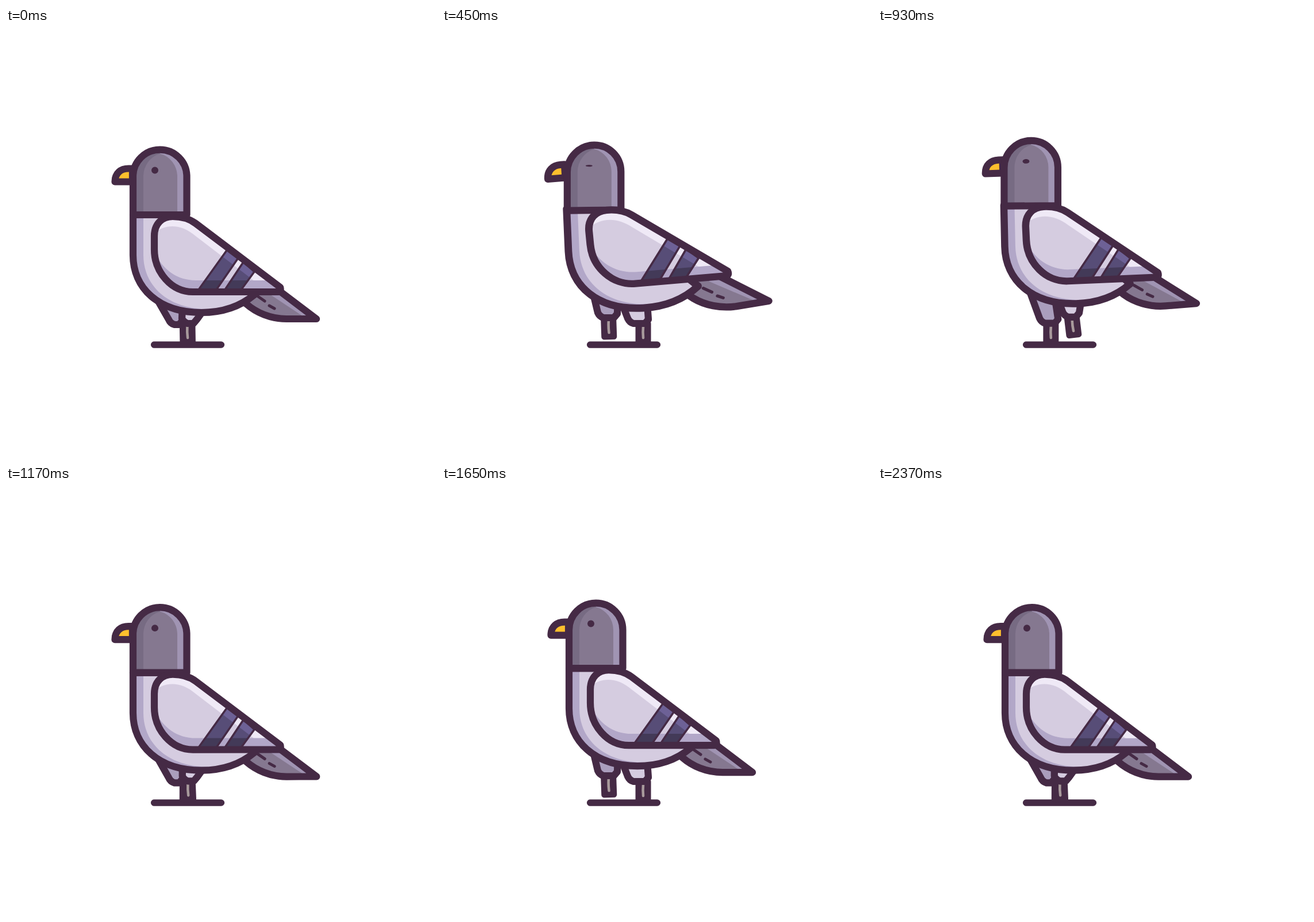
Recreate the animation shown at these times as an HTML page. Size 748 by 748 pixels, loop 2.4 s.

```html
<!DOCTYPE html>
<html lang="en">
<head>
<meta charset="utf-8">
<title>Walking pigeon</title>
<style>
  html, body { margin: 0; width: 100%; height: 100%; overflow: hidden; background: #fff; }
  svg { display: block; width: 100vw; height: 100vh; }
</style>
</head>
<body>
<svg id="stage" viewBox="0 0 748 748"></svg>
<script>
const INK = '#452a45', PALE = '#d5cce0', LIGHT = '#efe9f6', SHADE = '#b2a7c8', GREY = '#857890', SOFT = '#a094b3';
const OUTLINE = 12.2;
const stage = document.getElementById('stage');

const fill = (d, color) => `<path d="${d}" fill="${color}"/>`;
const line = (d, width, color = INK) =>
  `<path d="${d}" fill="none" stroke="${color}" stroke-width="${width}" stroke-linejoin="round" stroke-linecap="round"/>`;

// A filled outline with details clipped to its inside
const part = (id, d, base, details = '') => `
  <g id="${id}">
    <clipPath id="${id}Clip"><path d="${d}"/></clipPath>
    ${fill(d, base)}<g clip-path="url(#${id}Clip)">${details}</g>${line(d, OUTLINE)}
  </g>`;

const leg = (id, color) => `
  <g id="${id}Shin">
    <rect x="-13.5" y="-42" width="27" height="42" rx="5" fill="${INK}"/>
    <path d="M0 -32Q-1 -22 0 -12" fill="none" stroke="#a89a9c" stroke-width="4.5" stroke-linecap="round"/>
  </g>
  <path id="${id}Thigh" fill="${color}" stroke="${INK}" stroke-width="${OUTLINE}" stroke-linejoin="round"/>`;

const wingLight = 'M250 365C268 342 300 336 330 362L445 450H520V300H250Z';
const wingShade = 'M250 370C264 414 292 439 330 439H490V480H250Z';
const stripes = 'M386 384L333 458H364L404 400ZM413 407L379 458H407L432 424Z';

stage.innerHTML = `
  ${line('M257.7 551H374.3', 11.6)}
  <g id="tailBob">
    ${part('tail', 'M400 440L452 440L466 450L540 506H488C460 506 435 495 418 480L395 458Z', GREY,
      fill('M448 456L516 501H560L470 440Z', SOFT) +
      line('M437 466L450 475M458 483L467 488', 5))}
  </g>
  ${leg('far', '#aa9ebd')}
  ${leg('near', PALE)}
  <g id="bodyBob">
    ${part('body', 'M221 325V395C221 452 265 495 340 495C378 495 408 484 432 464L320 365L300 325Z', SHADE,
      fill('M239 320V395C239 448 281 489 352 489V500H450V320Z', PALE))}
    ${part('beak', 'M189.5 267.5C189.5 252 200 244.5 213 244.5H220V267.5Z', '#fdbf2d')}
    ${part('head', 'M221 325V258.3A46.75 46.75 0 0 1 314.5 258.3V325Z', '#776b83',
      fill('M268 200H320V330H268Z', SOFT) +
      fill('M239 330V258A41 41 0 0 1 268 218.5A41 41 0 0 1 298 258V330Z', GREY) +
      `<ellipse id="eye" cx="259" cy="247.5" rx="6" fill="${INK}"/>`)}
    ${part('wing', 'M258 385V362C258 340 272 328 290 328C305 328 318 331 330 340L477 451Q479 458 474 459H325C288 459 258 425 258 385Z', PALE,
      fill(wingLight, LIGHT) + fill(wingShade, SHADE) +
      `<clipPath id="stripeClip"><path d="${stripes}"/></clipPath>
       <g clip-path="url(#stripeClip)">` +
      fill(stripes, '#574d77') + fill(wingLight, '#6d6196') + fill(wingShade, '#433a58') +
      '</g>' + line(stripes, 3.5))}
  </g>`;

const el = {};
stage.querySelectorAll('[id]').forEach(node => el[node.id] = node);
const move = (id, value) => el[id].setAttribute('transform', value);

// Offset (dx, dy) at the anchor plus a linear stretch around it, scaled by k
function lean(id, k, [x, y], [dx, dy], [a, b, c, d]) {
  move(id, `matrix(${1 + k * a} ${k * c} ${k * b} ${1 + k * d}
    ${k * (dx - a * x - b * y)} ${k * (dy - c * x - d * y)})`);
}

// Smooth looping curve through values at the walk's key times
const STRIDE = 1200, TIMES = [0, 240, 450, 690, 870];
function sample(values, t) {
  const n = TIMES.length;
  const time = i => TIMES[(i + n) % n] + STRIDE * Math.floor(i / n);
  const value = i => values[(i + n) % n];
  const slope = i => (value(i + 1) - value(i - 1)) / (time(i + 1) - time(i - 1));
  let i = n - 1;
  while (TIMES[i] > t) i--;
  const span = time(i + 1) - time(i), u = (t - time(i)) / span, v = 1 - u;
  return v * v * (1 + 2 * u) * value(i) + u * u * (3 - 2 * u) * value(i + 1)
    + span * u * v * (v * slope(i) - u * slope(i + 1));
}

const GROUND = 551;
const legs = {
  far: {
    hip: [264, 306],
    kneeX: [295, 295, 288, 280, 296], kneeY: [516, 505, 504, 513, 513], half: [12, 15, 17, 17, 17],
    footX: [316, 307.5, 291, 275.5, 296], footY: [551, 540, 542, 551, 551], tilt: [0, -5, -2, 0, 0]
  },
  near: {
    hip: [308, 356],
    kneeX: [319, 331, 341, 341, 339], kneeY: [514, 512, 514, 515, 502], half: [13, 16, 18, 18, 15],
    footX: [316.5, 329.5, 350, 349.5, 346.5], footY: [551, 551, 551, 551, 538], tilt: [-2, 0, 0, 0, -7]
  }
};

function poseLeg(id, t, bob) {
  const { hip, ...keys } = legs[id];
  const at = name => sample(keys[name], t);
  const x = at('kneeX'), y = at('kneeY'), half = at('half'), top = 474 + bob;
  el[id + 'Thigh'].setAttribute('d', `M${hip[0]} ${top}L${x - half} ${y - 9}Q${x - half + 3} ${y - 2} ${x - half + 10} ${y}
    L${x + half - 6} ${y}L${x + half} ${y - 7}L${hip[1]} ${top}Z`);
  move(id + 'Shin', `translate(${at('footX')} ${Math.min(GROUND, at('footY'))}) rotate(${at('tilt')})`);
}

const wave = (t, period) => (1 - Math.cos(2 * Math.PI * t / period)) / 2;

function draw(now) {
  const t = now % 2400;
  const bob = -16 * wave(t, 600);
  const nod = t < 1200 ? wave(t, 1200) : 0;
  const k = 1.058 * nod;

  move('tailBob', `translate(0 ${bob})`);
  move('bodyBob', `translate(0 ${bob})`);
  lean('tail', k, [463, 486], [24, -11], [.05, .17, -.19, 0]);
  lean('body', k, [215, 360], [-3.3, 0], [.06, .05, -.065, .06]);
  lean('wing', k, [254, 360], [-3, 0], [.068, .107, -.1, 0]);
  lean('head', k, [267, 325], [-3.5, 0], [0, 0, -.012, 0]);
  lean('beak', k, [218, 255], [-7, 1], [0, .08, -.09, 0]);
  el.eye.setAttribute('ry', 6 * (1 - .85 * nod));

  for (const id in legs) poseLeg(id, t % STRIDE, bob);
  requestAnimationFrame(loop);
}
const start = performance.now();
const loop = () => draw(performance.now() - start);
loop();
</script>
</body>
</html>
```
